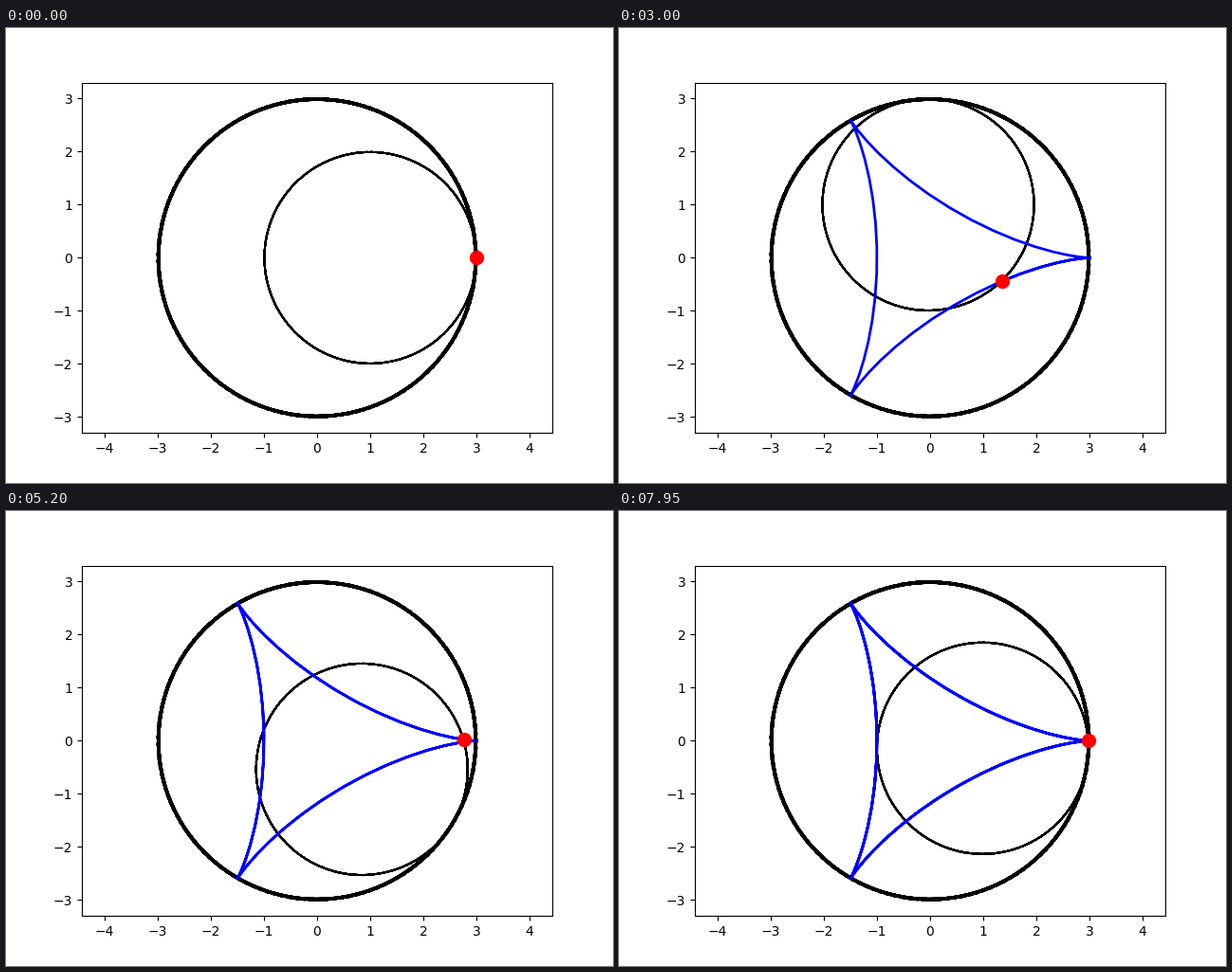
A matplotlib script that plays this animation: 640 px wide and 480 px high, repeating every 8 s.

```python
import numpy as np
import matplotlib.pyplot as plt
from matplotlib.animation import FuncAnimation

R, r = 3, 2          # fixed and rolling radii
FRAMES = 160

# Coarse angle steps over 15 turns; circles share the same samples.
t = np.linspace(0, 30 * np.pi, 400)
cx, cy = (R - r) * np.cos(t), (R - r) * np.sin(t)
ratio = (R - r) / r
px = cx + r * np.cos(ratio * t)
py = cy - r * np.sin(ratio * t)

fig, ax = plt.subplots(figsize=(6.4, 4.8), dpi=100)
ax.plot(R * np.cos(t), R * np.sin(t), "k", lw=2)
wheel, = ax.plot([], [], "k", lw=1)
trail, = ax.plot([], [], "b", lw=2)
pen, = ax.plot([], [], "ro", ms=10)

half = 1.1 * R
ax.set_ylim(-half, half)
ax.set_xlim(-half * 496 / 369.6, half * 496 / 369.6)


def update(i):
    wheel.set_data(cx[i] + r * np.cos(t), cy[i] + r * np.sin(t))
    trail.set_data(px[:i + 1], py[:i + 1])
    pen.set_data([px[i]], [py[i]])
    return wheel, trail, pen


anim = FuncAnimation(fig, update, frames=FRAMES, interval=50,
                     repeat=True, repeat_delay=0)
plt.show()
```
